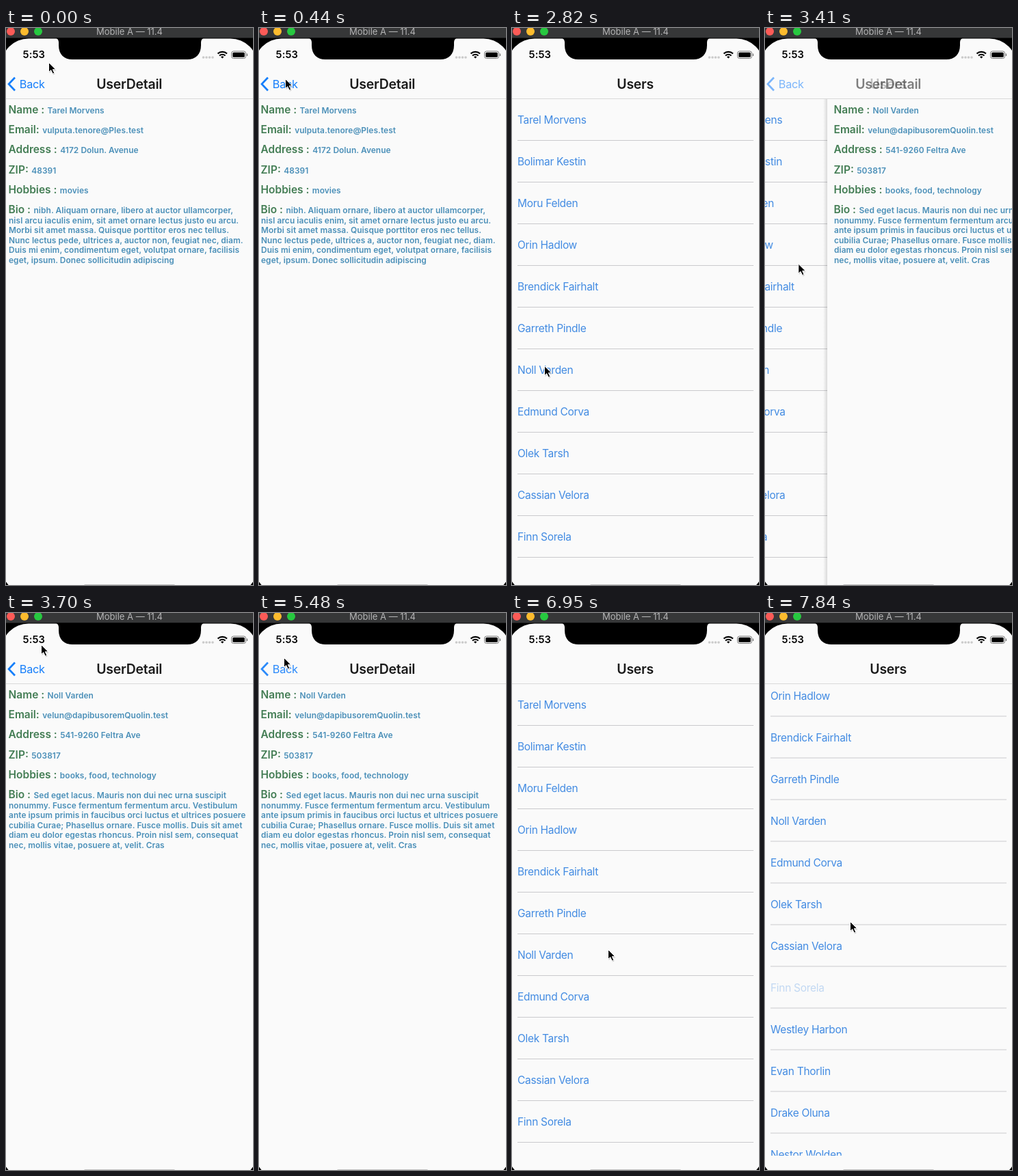
Write an HTML page that moves like this. It is 361 by 815 pixels and loops after 7990 ms.

```html
<!DOCTYPE html>
<html lang="en">
<head>
<meta charset="utf-8">
<title>User list</title>
<style>
  html, body { margin: 0; width: 100%; height: 100%; overflow: hidden; background: #000; }
  svg { display: block; width: 100vw; height: 100vh; }
  text { font-family: Inter, "Open Sans", sans-serif; white-space: pre; }
  .row { font-size: 15.5px; letter-spacing: -.3px; fill: #428be2; }
  .rule { stroke: #cacacd; }
  .title { font-size: 19.4px; font-weight: 600; letter-spacing: -.2px; text-anchor: middle; fill: #1a1a1a; }
  .label { font-size: 15.5px; font-weight: 600; fill: #437d54; }
  .value { font-size: 11.9px; font-weight: 600; letter-spacing: .08px; fill: #4a8fb8; }
</style>
</head>
<body>
<svg viewBox="0 0 361 815" xmlns="http://www.w3.org/2000/svg">
  <defs>
    <clipPath id="screen"><rect x="-7" y="15.5" width="375" height="812" rx="40"/></clipPath>
    <clipPath id="listArea"><rect x="-7" y="104" width="375" height="690"/></clipPath>
    <linearGradient id="edge"><stop stop-color="#000" stop-opacity="0"/><stop offset="1" stop-color="#000" stop-opacity=".13"/></linearGradient>
  </defs>

  <rect width="361" height="815"/>
  <rect width="361" height="14.5" fill="#363738"/>
  <circle cx="7" cy="5" r="6" fill="#fc5b57"/>
  <circle cx="27" cy="5" r="6" fill="#fdbc2e"/>
  <circle cx="47" cy="5" r="6" fill="#27c840"/>
  <text x="180.5" y="10" font-size="13" text-anchor="middle" fill="#b5b5b6">Mobile A — 11.4</text>

  <g clip-path="url(#screen)">
    <rect x="-7" y="15" width="375" height="813" fill="#fafafa"/>
    <g clip-path="url(#listArea)"><g id="list"></g></g>
    <g id="detail">
      <rect x="-13" y="104" width="6" height="724" fill="url(#edge)"/>
      <rect x="-7" y="104" width="375" height="724" fill="#fafafa"/>
      <g id="fields"></g>
    </g>
    <path d="M-7 103.5H368" stroke="#dadada"/>
    <text id="usersTitle" class="title" x="180.2" y="89">Users</text>
    <g id="detailHeader">
      <text class="title" x="180.2" y="89">UserDetail</text>
      <g id="back">
        <path d="M13 72.5 4 82l9 9.5" fill="none" stroke="#157efb" stroke-width="2.7"/>
        <text x="19.8" y="88" font-size="16.3" letter-spacing="-.3" fill="#157efb">Back</text>
      </g>
    </g>
    <rect x="113" y="814.5" width="135" height="5" rx="2.5" fill="#888"/>
  </g>

  <path d="M71 14.5c4 0 6 3 6 7v4c0 13 8 20.5 20 20.5h168c12 0 20-7.5 20-20.5v-4c0-4 2-7 6-7z"/>
  <text x="24.6" y="44" font-size="14.7" font-weight="600" letter-spacing=".1">5:53</text>
  <g fill="#cbcbcb">
    <circle cx="288.5" cy="43" r="1.8"/><circle cx="293" cy="43" r="1.8"/>
    <circle cx="297.5" cy="43" r="1.8"/><circle cx="302" cy="43" r="1.8"/>
  </g>
  <g fill="none" stroke="#000" stroke-width="2.2">
    <path d="M309.5 37.5a9.8 9.8 0 0 1 13.5 0M312 40.5a6 6 0 0 1 8.500 0"/>
    <path d="M314 42.2 316.2 44.6 318.4 42.2a3.2 3.2 0 0 0-4.4 0z" fill="#000" stroke="none"/>
    <rect x="329.5" y="34" width="21" height="10.5" rx="3" stroke="#777" stroke-width="1"/>
    <rect x="331.2" y="35.7" width="17.6" height="7.1" rx="1.5" fill="#000" stroke="none"/>
    <path d="M352.5 37.5v3.5" stroke="#777" stroke-width="1.3"/>
  </g>

  <g id="cursor">
    <path d="M1.5 2v14l3-2.5 2.5 5 2.5-1-2-5h4z" fill="#000" opacity=".18"/>
    <path d="M.5.5V14.500L3.7 11.6 6.3 17 8.7 15.9 6.3 10.7H10.700z" stroke="#fff" stroke-width="1" stroke-linejoin="round"/>
  </g>
</svg>

<script>
const LOOP = 7990, STEP = 148, LAST_STEP = 53;
const SCREEN = 375, PARALLAX = 0.3, ROW = 61;

const names = ["Tarel Morvens", "Bolimar Kestin", "Moru Felden", "Orin Hadlow", "Brendick Fairhalt",
  "Garreth Pindle", "Noll Varden", "Edmund Corva", "Olek Tarsh", "Cassian Velora", "Finn Sorela",
  "Westley Harbon", "Evan Thorlin", "Drake Oluna", "Nestor Wolden"];

const users = [
  {
    name: names[0], email: "vulputa.tenore@Ples.test", address: "4172 Dolun. Avenue", zip: "48391", hobbies: "movies",
    bio: ["nibh. Aliquam ornare, libero at auctor ullamcorper,",
      "nisl arcu iaculis enim, sit amet ornare lectus justo eu arcu.",
      "Morbi sit amet massa. Quisque porttitor eros nec tellus.",
      "Nunc lectus pede, ultrices a, auctor non, feugiat nec, diam.",
      "Duis mi enim, condimentum eget, volutpat ornare, facilisis",
      "eget, ipsum. Donec sollicitudin adipiscing"]
  },
  {
    name: names[6], email: "velun@dapibusoremQuolin.test", address: "541-9260 Feltra Ave", zip: "503817", hobbies: "books, food, technology",
    bio: ["Sed eget lacus. Mauris non dui nec urna suscipit",
      "nonummy. Fusce fermentum fermentum arcu. Vestibulum",
      "ante ipsum primis in faucibus orci luctus et ultrices posuere",
      "cubilia Curae; Phasellus ornare. Fusce mollis. Duis sit amet",
      "diam eu dolor egestas rhoncus. Proin nisl sem, consequat",
      "nec, mollis vitae, posuere at, velit. Cras"]
  }
];

// Pointer stops: step, x, y
const pointer = [[0, 62, 50], [3, 38, 74], [12, 38, 74], [14, 27, 206], [17, 46, 488], [19, 47, 494],
  [22, 47, 494], [25, 51, 46], [26, 51, 46], [29, 36, 65], [38, 36, 65], [44, 57, 328],
  [47, 140, 492], [51, 130, 745], [52, 129, 740], [53, 124, 451]];

const el = id => document.getElementById(id);

el("list").innerHTML = names.map((name, i) =>
  `<text class="row" x="8" y="${140 + i * ROW}">${name}</text>
   <path class="rule" d="M8 ${164.5 + i * ROW}H353"/>`).join("");
const rows = document.querySelectorAll(".row");

function fieldsMarkup(user) {
  const fields = [["Name :", user.name], ["Email:", user.email], ["Address :", user.address],
    ["ZIP:", user.zip], ["Hobbies :", user.hobbies], ["Bio :", user.bio[0]]];
  const first = fields.map(([label, value], i) =>
    `<text class="label" x="2.5" y="${124.7 + i * 29.35}">${label} <tspan class="value" dx=".5">${value}</tspan></text>`);
  const rest = user.bio.slice(1).map((line, i) =>
    `<text class="value" x="3" y="${285.8 + i * 14.45}">${line}</text>`);
  return first.concat(rest).join("");
}

// Cubic bezier (.2833, .99, .31833, .99) over 500 ms
function slide(ms) {
  const x = Math.min(1, Math.max(0, ms / 500));
  if (x === 0 || x === 1) return x;
  const curve = (s, a, b) => 3 * a * s * (1 - s) ** 2 + 3 * b * s * s * (1 - s) + s ** 3;
  let low = 0, high = 1;
  for (let i = 0; i < 24; i++) {
    const mid = (low + high) / 2;
    if (curve(mid, 0.2833, 0.31833) < x) low = mid; else high = mid;
  }
  return curve(low, 0.99, 0.99);
}

function pointerAt(step) {
  const next = Math.max(1, pointer.findIndex(stop => stop[0] >= step));
  const [s0, x0, y0] = pointer[next - 1], [s1, x1, y1] = pointer[next];
  const k = (step - s0) / (s1 - s0);
  return [x0 + (x1 - x0) * k, y0 + (y1 - y0) * k];
}

const move = (id, x, y) => el(id).setAttribute("transform", `translate(${x} ${y})`);
const fade = (node, opacity) => node.setAttribute("opacity", opacity);
let shownUser;

function draw(now) {
  const step = Math.min(LAST_STEP, Math.floor((now % LOOP + 8) / STEP));
  const t = step * STEP;
  const open = slide(t + 424) - slide(t - 1954) + slide(t - 3276) - slide(t - 5652);

  const user = users[t < 2700 ? 0 : 1];
  if (user !== shownUser) el("fields").innerHTML = fieldsMarkup(shownUser = user);

  move("detail", Math.round(SCREEN * (1 - open)), 0);
  move("list", -PARALLAX * SCREEN * open, step === LAST_STEP ? -196.5 : 0);
  fade(el("usersTitle"), 1 - open);
  fade(el("detailHeader"), open ** 2);

  const backPress = { 12: 0.9, 13: 0.35, 37: 0.9, 38: 0.35 };
  fade(el("back"), backPress[step] ?? 1);
  fade(rows[6], step === 21 || step === 22 ? 0.3 : 1);
  fade(rows[10], step === LAST_STEP ? 0.3 : 1);

  move("cursor", ...pointerAt(step));
}

const start = performance.now();
function tick() {
  draw(performance.now() - start);
  requestAnimationFrame(tick);
}
tick();
</script>
</body>
</html>
```
